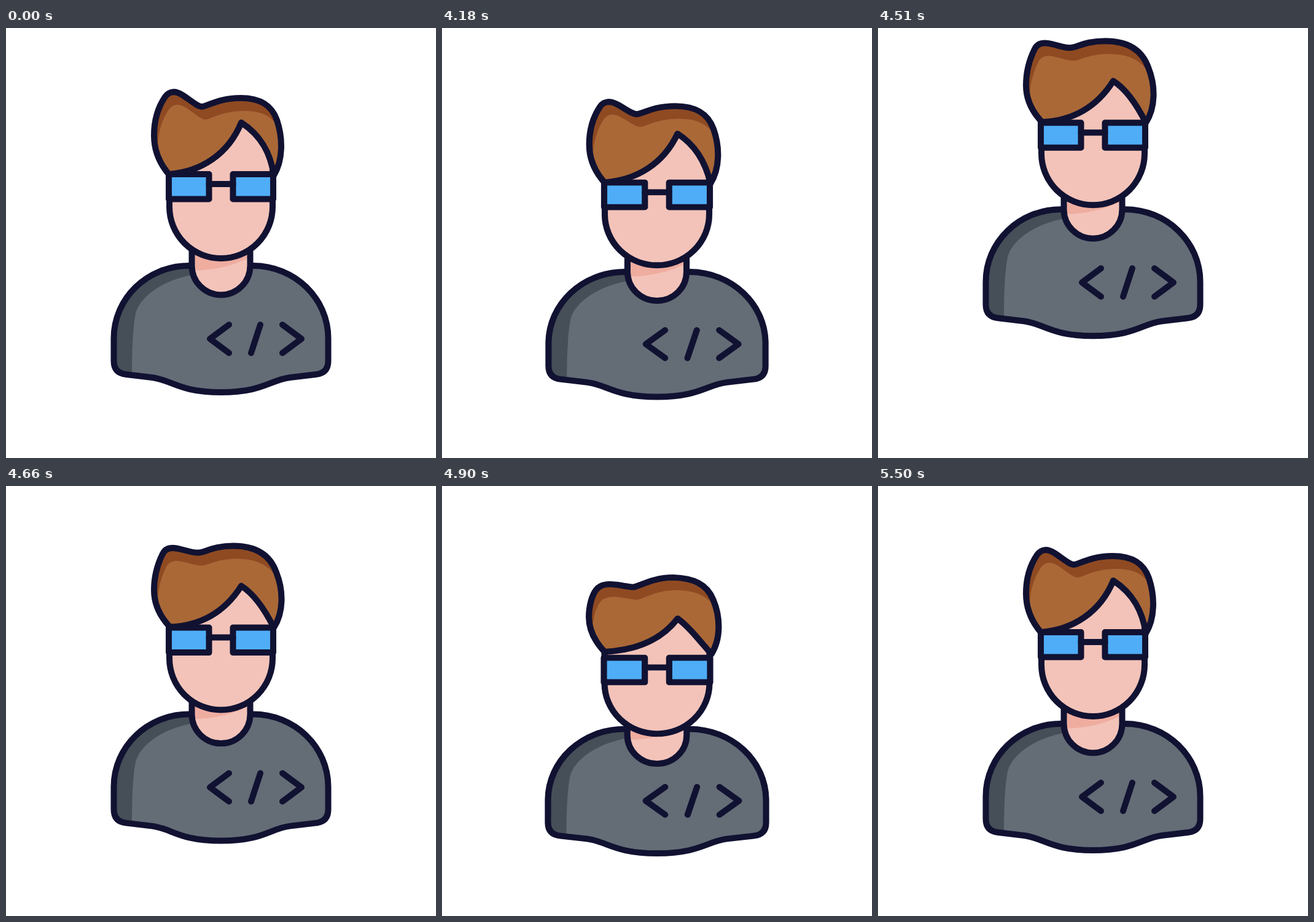
An HTML page without scripts that plays this animation: 700 px wide and 700 px high, repeating every 5560 ms.

```html
<!DOCTYPE html>
<html lang="en">
<head>
<meta charset="utf-8">
<title>Developer avatar</title>
<style>
  html, body { margin: 0; height: 100%; overflow: hidden; background: #fff; }
  svg { display: block; width: 100vw; height: 100vh; }

  .line { stroke: #111232; stroke-width: 10; stroke-linecap: round; stroke-linejoin: round; }
  .none { fill: none; }
  .skin { fill: #f3c3b9; }
  .lens { fill: #4fadf7; }

  .figure, .head, .face, .neck, .hair, .lock {
    animation: 5560ms cubic-bezier(.37, 0, .63, 1) infinite;
  }
  .figure { transform-origin: 350px 597px; animation-name: jump, squash; }
  .head { animation-name: head-lag; }
  .face { animation-name: face-lag; }
  .neck { animation-name: neck-lag; }
  .hair { transform-origin: 350px 240px; animation-name: hair-stretch; }
  .lock { animation-name: hair-shape; }

  @keyframes jump {
    0%, 72.48% { translate: 0 0; }
    72.481% { translate: 0 5px; animation-timing-function: ease-out; }
    74.1% { translate: 0 15px; }
    80.58% { translate: 0 -95px; }
    85.61% { translate: 0 15px; }
    90.83% { translate: 0 -6px; }
    93.53% { translate: 0 4px; }
    97.12%, 100% { translate: 0 0; }
  }
  @keyframes squash {
    0%, 72.48% { scale: 1 1; }
    72.481% { scale: 1.006 .994; animation-timing-function: ease-out; }
    74.1% { scale: 1.022 .978; }
    76.44%, 83.9% { scale: 1 1; }
    85.79% { scale: 1.033 .967; }
    90.65% { scale: 1 1; }
    93.53% { scale: 1.005 .995; }
    97.12%, 100% { scale: 1 1; }
  }
  @keyframes head-lag {
    0%, 74.46%, 91%, 100% { translate: 0 0; }
    76.8%, 84.17% { translate: 0 8px; }
    88.13% { translate: 0 31px; }
  }
  @keyframes face-lag {
    0%, 74.46%, 91%, 100% { translate: 0 0; }
    76.8%, 84.17% { translate: 0 5px; }
    88.13% { translate: 0 20px; }
  }
  @keyframes neck-lag {
    0%, 84.17%, 91%, 100% { translate: 0 0; }
    88.13% { translate: 0 10px; }
  }
  @keyframes hair-stretch {
    0%, 89.5%, 92.8%, 100% { scale: 1 1; }
    91.2% { scale: 1 1.025; }
  }
  @keyframes hair-shape {
    0%, 74.46%, 91%, 100% {
      d: path("M265 238C248 218 241 198 241 175C241 150 248 128 259 112C266 102 276 102 287 109C300 117 311 128 319 128C327 128 345 114 382 114C412 114 432 124 441 150C451 180 451 215 436 240C431 206 417 176 383 154C362 205 318 234 265 238Z");
    }
    76.8%, 84.17% {
      d: path("M267 237C248 217 241 198 241 177C241 152 248 132 255 118C260 107 272 107 283 110C296 113 304 116 312 116C324 116 336 105 370 105C408 105 430 120 440 148C452 178 452 213 436 238C420 206 402 182 383 170C354 216 312 235 267 237Z");
    }
    88.13% {
      d: path("M266 228C248 208 241 190 241 171C241 152 246 134 253 125C261 114 276 116 285 117C298 119 308 121 312 121C322 120 342 105 376 105C408 106 430 116 440 142C452 172 452 207 437 232C412 202 400 186 383 173C354 212 310 226 266 228Z");
    }
  }
</style>
</head>
<body>
<svg viewBox="0 0 700 700">
  <defs>
    <clipPath id="hair-clip"><path class="lock"/></clipPath>
    <path id="torso" d="M298 387C230 387 175.500 440 175.500 505V542Q175.500 562 196 564L238 569C270 573 282 593 350 593C418 593 430 573 462 569L504 564Q524.500 562 524.500 542V505C524.500 440 470 387 402 387Z"/>
  </defs>

  <g class="figure">
    <use href="#torso" fill="#646d76"/>
    <path fill="#464e57" d="M298 387C230 387 175.500 440 175.500 505V542Q175.500 562 196 564L205 565C205 530 206 490 211 465C217 440 250 412 303 402V387Z"/>
    <use href="#torso" class="line none"/>
    <path class="line none" d="M363 483L332 506L363 529M414 483L399 529M450 483L481 506L450 529"/>

    <g class="neck">
      <path class="skin" d="M302.500 350V387A47.500 47.500 0 0 0 397.500 387V350Z"/>
      <path fill="#efada0" d="M303 350V395Q358 394 397 373V350Z"/>
      <path class="line none" d="M302.500 362V387A47.500 47.500 0 0 0 397.500 387V362"/>
    </g>

    <g class="face">
      <path class="skin" d="M266 291V200Q350 90 434 200V291Z"/>
      <path class="line skin" d="M266 228V291A84 84 0 0 0 434 291V228"/>
    </g>

    <g class="head">
      <g class="hair">
        <path class="lock" fill="#8f4a22"/>
        <g clip-path="url(#hair-clip)">
          <path class="lock" fill="#aa6837" transform="translate(6 21)"/>
        </g>
        <path class="lock line none"/>
      </g>
      <g class="line lens">
        <rect x="265" y="238" width="65.500" height="40.500"/>
        <rect x="369.500" y="238" width="65.500" height="40.500"/>
        <path d="M330.500 254H369.500"/>
      </g>
    </g>
  </g>
</svg>
</body>
</html>
```
